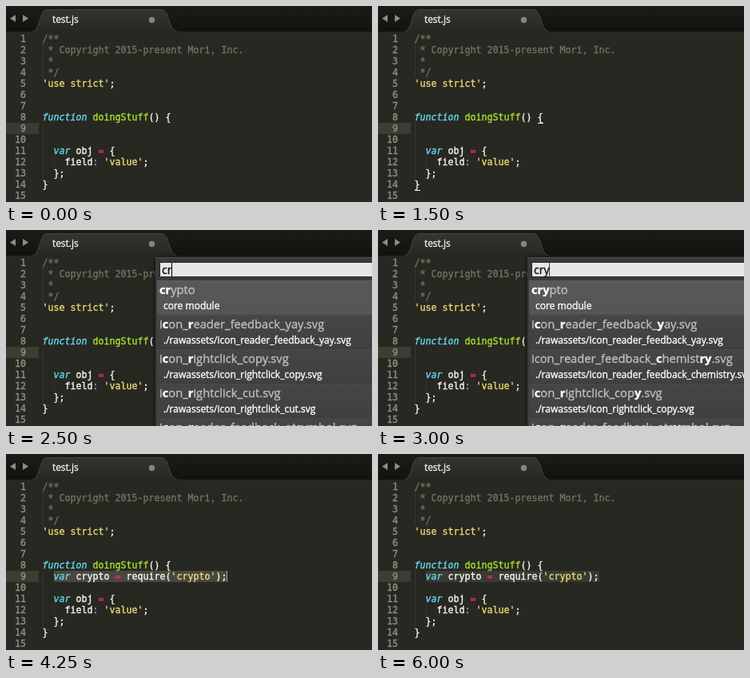
Recreate the animation shown at these times as an HTML page with a canvas. Size 458 by 245 pixels, loop 6.5 s.

```html
<!DOCTYPE html>
<html lang="en">
<head>
<meta charset="utf-8">
<title>Editor</title>
<style>
html, body { margin: 0; width: 100%; height: 100%; overflow: hidden; background: #272822; }
canvas { display: block; }
</style>
</head>
<body>
<canvas id="stage" width="458" height="245"></canvas>
<script>
const g = document.getElementById('stage').getContext('2d');
const LOOP = 6500, LEFT = 45.6, CELL = 7, TOP = 34, LINE = 14;
const MONO = '"DejaVu Sans Mono", monospace', SANS = '"Open Sans", sans-serif';
const INK = { w: '#f8f8f2', c: '#75715e', s: '#e6db74', k: '#66d9ef', f: '#a6e22e', o: '#f92672', p: '#ae81ff' };

// Each line is a list of [ink, text] runs
const code = [
  [['c', '/**']],
  [['c', ' * Copyright 2015-present Mori, Inc.']],
  [['c', ' *']],
  [['c', ' */']],
  [['s', "'use strict'"], ['w', ';']],
  [], [],
  [['k', 'function'], ['w', ' '], ['f', 'doingStuff'], ['w', '() {']],
  [], [],
  [['w', '  '], ['k', 'var'], ['w', ' obj '], ['o', '='], ['w', ' {']],
  [['w', '    field'], ['p', ':'], ['w', ' '], ['s', "'value'"], ['w', ';']],
  [['w', '  };']],
  [['w', '}']],
  []
];
const requireLine = [['w', '  '], ['k', 'var'], ['w', ' crypto '], ['o', '='],
  ['w', ' require('], ['s', "'crypto'"], ['w', ');']];

// Matched letters stand between asterisks
const files = (folder, names) => names.map(n => [n, `./${folder}/${n.replaceAll('*', '')}`]);
const tests = files('__integration_tests__', ['accessLevelTest.js', 'accountTests.js',
  'activityTest.js', 'adminDraftTests.js', 'adminEmailImportTest.js']);
const matchCr = [['*cr*ypto', 'core module'], ...files('rawassets', [
  'i*c*on_*r*eader_feedback_yay.svg', 'i*c*on_*r*ightclick_copy.svg',
  'i*c*on_*r*ightclick_cut.svg', 'i*c*on_*r*eader_feedback_atsymbol.svg'])];
const matchCry = [['*cry*pto', 'core module'], ...files('rawassets', [
  'i*c*on_*r*eader_feedback_*y*ay.svg', 'icon_reader_feedback_*c*hemist*ry*.svg',
  'i*c*on_*r*ightclick_cop*y*.svg', 'i*c*on_*r*eader_feedback_ats*y*mbol.svg'])];

function box(x, y, w, h, color) {
  g.fillStyle = color;
  g.fillRect(x, y, w, h);
}

function shape(color, ...points) {
  g.fillStyle = color;
  g.beginPath();
  points.forEach(([x, y]) => g.lineTo(x, y));
  g.fill();
}

// Filled and thinly stroked, for slightly heavier letters
function text(str, x, y, color, font, align = 'left') {
  g.font = font;
  g.textAlign = align;
  g.fillStyle = g.strokeStyle = color;
  g.lineWidth = 0.35;
  g.lineJoin = 'round';
  g.fillText(str, x, y);
  g.strokeText(str, x, y);
  return x + g.measureText(str).width;
}

function fade(y0, y1, from, to) {
  const grad = g.createLinearGradient(0, y0, 0, y1);
  grad.addColorStop(0, from);
  grad.addColorStop(1, to);
  return grad;
}

function caret(x, y, h, color, alpha) {
  g.globalAlpha = alpha;
  box(x, y, 1, h, color);
  g.globalAlpha = 1;
}

function drawTabs() {
  box(0, 0, 458, 32, fade(0, 32, '#1b1c18', '#12130f'));
  shape('#8b8c86', [5, 15.5], [12, 11], [12, 20]);
  shape('#8b8c86', [28, 15.5], [21, 11], [21, 20]);
  g.beginPath();
  g.moveTo(33, 32);
  g.bezierCurveTo(43, 31, 41, 4.5, 52, 4.5);
  g.lineTo(194, 4.5);
  g.bezierCurveTo(205, 4.5, 203, 31, 214, 32);
  g.fillStyle = fade(4, 32, '#34352f', '#272822');
  g.fill();
  g.lineWidth = 1;
  g.strokeStyle = '#44453f';
  g.stroke();
  box(0, 32, 458, 2, '#272822');
  text('test.js', 58, 21, '#f2f2ee', '11.9px ' + SANS);
  g.fillStyle = '#85867f';
  g.beginPath();
  g.arc(182.5, 17.5, 3.7, 0, 7);
  g.fill();
}

function drawLine(runs, y) {
  let col = 0;
  for (const [ink, str] of runs) {
    text(str, LEFT + col * CELL, y, INK[ink], (ink === 'k' ? 'italic ' : '') + '11.63px ' + MONO);
    col += str.length;
  }
}

function drawCode(t) {
  const done = t >= 3250;
  box(0, 146, 41, LINE, t < 750 ? '#393a33' : '#3e3d32');
  box(46, 48, 1, 42, '#36372f');
  box(46, 146, 1, 70, '#36372f');
  box(60, 188, 1, LINE, '#36372f');
  if (done) box(60, 146, 217, LINE, t < 6000 ? '#49483e' : '#393a33');
  code.forEach((runs, i) => {
    const y = TOP + i * LINE + 11;
    text(i + 1, 25, y, '#8f908a', '11.63px ' + MONO, 'right');
    drawLine(done && i === 8 ? requireLine : runs, y);
  });
  if (t >= 750 && t < 1750) {
    box(200, 146, 7, 1, INK.w);
    box(46, 230, 7, 1, INK.w);
  }
}

function drawRow([name, path], i) {
  const y = 63 + i * 43;
  box(189, y, 269, 43, i ? fade(y, y + 43, '#464646', '#404040') : fade(y, y + 43, '#595959', '#555555'));
  box(189, y, 269, 1, i ? '#4a4a4a' : '#5e5e5e');
  box(189, y + 42, 269, 1, i ? '#3b3b3b' : '#505050');
  let x = 192;
  name.split('*').forEach((part, n) => {
    x = text(part, x, y + 17, n % 2 ? '#ffffff' : '#bebebe', (n % 2 ? 'bold ' : '') + '14.7px ' + SANS);
  });
  text(path, 197, y + 36, '#ffffff', '12px ' + SANS);
}

function drawPalette(t) {
  const [query, rows] = t < 2500 ? ['', tests] : t < 2750 ? ['cr', matchCr] : ['cry', matchCry];
  g.shadowColor = '#000000aa';
  g.shadowBlur = 6;
  box(187, 34, 280, 220, '#3a3a3a');
  g.shadowBlur = 0;
  box(187, 34, 271, 1, '#505050');
  box(192, 40, 266, 19, '#2b2b2b');
  box(193, 41, 265, 17, '#e6e6e6');
  rows.forEach(drawRow);
  const end = text(query, 195, 55, '#111111', '14px ' + SANS);
  const dim = t >= 2250 && t < 2500 || t >= 3000;
  caret(query ? Math.round(end) : 194, 41, 17, '#000000', dim ? 0.7 : 1);
}

// The caret holds for half a second, then pulses once a second
function pulse(ms) {
  if (ms < 250) return 1;
  return [1, 0.5, 0, 0.5][Math.floor(ms / 250 - 1) % 4];
}

function draw(t) {
  box(0, 0, 458, 245, '#272822');
  drawTabs();
  drawCode(t);
  if (t >= 750 && t < 1750) caret(59, 146, LINE, INK.w, pulse(t - 750));
  if (t >= 3250 && t < 6000) caret(276, 146, LINE, INK.w, pulse(t - 3250));
  if (t >= 1750 && t < 3250) drawPalette(t);
}

const start = performance.now();
function tick() {
  draw((performance.now() - start) % LOOP);
  requestAnimationFrame(tick);
}
tick();
</script>
</body>
</html>
```
